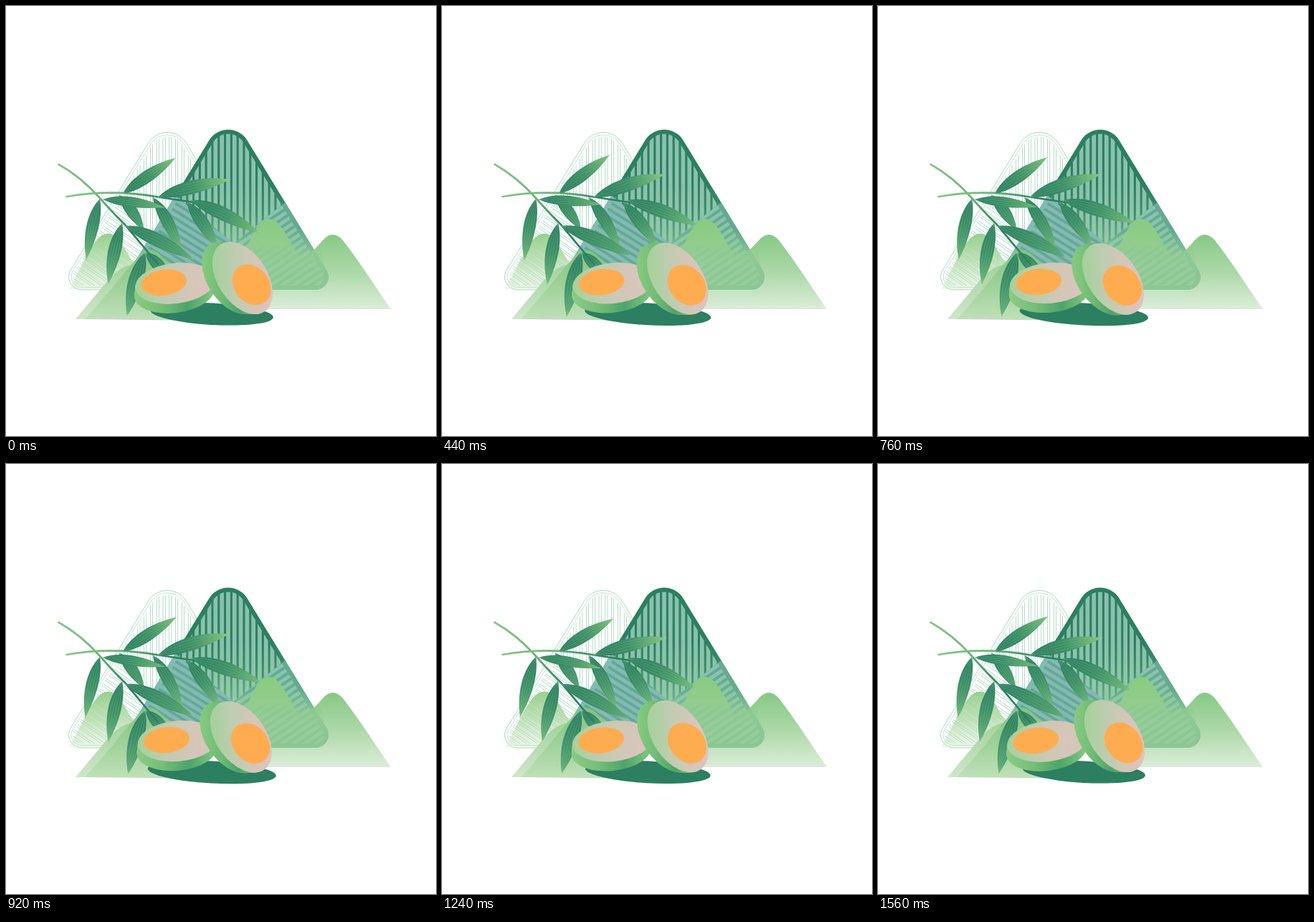
Write an HTML page with a canvas that moves like this. It is 600 by 600 pixels and loops after 1.6 s.

```html
<!DOCTYPE html>
<html lang="en">
<head>
<meta charset="utf-8">
<title>Rice dumpling hills</title>
<style>
  html, body { margin: 0; width: 100%; height: 100%; overflow: hidden; background: #fff; }
  canvas { display: block; }
</style>
</head>
<body>
<canvas id="stage" width="600" height="600"></canvas>
<script>
const ctx = document.getElementById('stage').getContext('2d');
const LOOP = 1600, STEP = 40, TAU = Math.PI * 2, DEG = Math.PI / 180;
const DARK = '#2c7f61', LIGHT = '#86c784';

function gradient(x0, y0, x1, y1, ...colors) {
  const g = ctx.createLinearGradient(x0, y0, x1, y1);
  colors.forEach((c, i) => g.addColorStop(i / (colors.length - 1), c));
  return g;
}

function fillPath(d, paint) {
  ctx.fillStyle = paint;
  ctx.fill(new Path2D(d));
}

function strokePath(path, paint, width) {
  ctx.strokeStyle = paint;
  ctx.lineWidth = width;
  ctx.stroke(path);
}

// Rounded triangle shared by both dumplings, apex above (cx, top).
function dumpling(cx, top, inset) {
  const slope = 1.636, apex = top - 29 + inset * 1.92, base = 396 - inset;
  const half = (base - apex) / slope, p = new Path2D();
  const left = [cx - half, base], right = [cx + half, base];
  p.moveTo(cx, base);
  p.arcTo(...right, cx, apex, 18 - inset);
  p.arcTo(cx, apex, ...left, 31 - inset);
  p.arcTo(...left, cx, base, 18 - inset);
  p.closePath();
  return p;
}

// Parallel slats: upright, or slanted when an angle is given.
function slats(cx, cy, angle, pitch, width, paint, outline) {
  ctx.save();
  ctx.translate(cx, cy);
  ctx.rotate(angle);
  ctx.fillStyle = ctx.strokeStyle = paint;
  ctx.lineWidth = 0.6;
  for (let i = -18; i <= 18; i++) {
    const x = i * pitch - width / 2;
    if (outline) ctx.strokeRect(x, -260, width, 520);
    else ctx.fillRect(x, -260, width, 520);
  }
  ctx.restore();
}

function clipped(paths, draw) {
  ctx.save();
  paths.forEach(p => ctx.clip(p));
  draw();
  ctx.restore();
}

function paleDumpling() {
  const line = '#83c6a6';
  const inner = dumpling(225, 177, 6);
  strokePath(dumpling(225, 177, 0), line, 0.7);
  strokePath(dumpling(225, 177, 3.5), line, 0.5);
  const fold = new Path2D('M60 150H320V400L146 272L60 272Z');
  const flap = new Path2D('M60 272H146L320 400H60Z');
  clipped([inner, fold], () => slats(225, 290, 0, 8.8, 5.6, line, true));
  clipped([inner, flap], () => slats(130, 340, -55 * DEG, 8.4, 5, line, true));
}

function greenDumpling() {
  const shell = dumpling(310, 173, 0), inner = dumpling(310, 173, 6);
  fillShape(shell, gradient(0, 173, 0, 396,
    DARK, DARK, DARK, '#3b8c6e', '#61a98c', '#84c391', '#8dc99a'));

  const front = new Path2D('M150 150H480V210L388 275L318 332L236 264L150 190Z');
  clipped([inner, front], () =>
    slats(310, 290, 0, 8.8, 5.7, gradient(0, -110, 0, 45, '#89c0b0', '#8ac2ac', '#95cba4')));

  const leftFlap = new Path2D('M130 200L236 264L318 332V400H130Z');
  const rightFlap = new Path2D('M480 215L388 275L318 332V400H480Z');
  clipped([shell, leftFlap], () => {
    ctx.fillStyle = '#82bbaf';
    ctx.fillRect(130, 180, 200, 220);
  });
  clipped([shell, rightFlap], () => {
    ctx.fillStyle = gradient(0, 275, 0, 352, '#65aa91', '#63ab8d', '#8bc795');
    ctx.fillRect(310, 180, 170, 220);
  });
  clipped([inner, leftFlap], () => slats(240, 320, -58 * DEG, 9, 3.8, '#66a69b'));
  clipped([inner, rightFlap], () => {
    ctx.fillStyle = gradient(0, 280, 0, 352, '#8ac2b3', '#8ac5a8', '#97cd9b');
    ctx.fillRect(310, 200, 170, 200);
    slats(400, 320, 56 * DEG, 9, 4, gradient(-33, -22, 27, 18, '#62a794', '#69ae92', '#8bc795'));
  });
}

function fillShape(path, paint) {
  ctx.fillStyle = paint;
  ctx.fill(path);
}

function farHills() {
  fillPath('M340 423V380L400 370Q420 352 442 327Q456 311 470 327C492 355 515 391 537 423Z',
    gradient(0, 319, 0, 423, '#87c985', '#acd8a8', '#dcedd9'));
}

function nearHills() {
  fillPath('M88 395C104 368 112 345 127 326Q142 309 158 326L200 395Z',
    gradient(0, 317, 0, 396, '#97cf8d', 'rgba(175,217,166,.75)', 'rgba(205,230,198,.35)'));
  fillPath('M97 437L142 383Q160 362 180 360L230 400V437Z',
    gradient(0, 365, 0, 437, '#a5d49f', '#cfe6ca'));
  fillPath('M110 437C140 405 165 371 188 346Q202 333 217 349L275 400V439Z',
    gradient(0, 340, 0, 438, '#80c380', '#9ed198', '#c0e0ba'));
  // Soft hill lapping over the lower right corner of the dumpling.
  fillPath('M320 350C337 345 341 321 352 306Q367 288 382 306C393 319 400 340 411 350' +
    'Q425 346 437 333L446 362L436 368H320Z',
    gradient(0, 297, 0, 368, '#88cb80', '#92cd8d', 'rgba(145,203,152,0)'));
}

function branches() {
  ctx.lineCap = 'round';
  strokePath(new Path2D('M73.5 221Q104 238 130 267T165 304L212 360'),
    gradient(73, 220, 175, 310, LIGHT, '#6eb678', DARK), 2.7);
  strokePath(new Path2D('M84.5 266Q148 255 212 266.5L262 274'),
    gradient(84, 0, 230, 0, LIGHT, '#6eb678', DARK), 2.7);
}

// Base, resting tip, width, swing in radians, phase in degrees, bend, tip colour.
const LEAVES = [
  [158, 264, 193, 313, 17, 0.02, -20, -2, '#4c9b6c'],
  [205, 267, 246, 341, 18, 0.04, -30, -3, '#6bb476'],
  [253, 274, 297, 336, 19, 0.045, -30, -2, '#6bb476'],
  [195, 344, 232, 385, 18, 0.03, -25, -2, '#4c9b6c'],
  [131, 269, 112, 354, 18, 0.036, 0, 2, '#68b278'],
  [135, 270, 221, 281, 15, 0.046, 0, -2, '#68b273'],
  [162, 303, 143.5, 388, 19, 0.042, -15, 2, '#68b278'],
  [166, 307, 262, 352, 20, 0.04, -20, -3, '#56a470'],
  [194, 344, 170.5, 432.5, 22, 0.04, -25, 2, '#62ad76'],
  [163, 262, 236.5, 212, 18, 0.055, 0, -1, '#7abf79'],
  [212, 267, 312, 238.7, 20, 0.047, -45, -3, '#86c67e'],
  [258, 271, 355.7, 310, 20, 0.072, -68, -3, '#72b978']
];

function leaf([x, y, tipX, tipY, width, swing, phase, bend, tipColor], angle) {
  const len = Math.hypot(tipX - x, tipY - y);
  const rib = w => `C${len * 0.26} ${w * 0.66 + bend} ${len * 0.64} ${w * 0.6 + bend} ${len} 0`;
  ctx.save();
  ctx.translate(x, y);
  ctx.rotate(Math.atan2(tipY - y, tipX - x) - swing * Math.sin(angle + phase * DEG));
  const body = new Path2D(`M0 0${rib(-width)}L0 0${rib(width)}L0 0Z`);
  fillShape(body, gradient(0, 0, len, 0, '#287b60', '#3f9169', tipColor));
  ctx.globalAlpha = 0.35;
  for (const k of [-0.6, -0.2, 0.2, 0.6])
    strokePath(new Path2D('M0 0' + rib(width * k)), '#9bd09a', 0.6);
  ctx.restore();
}

function ellipse(x, y, rx, ry, tilt, paint) {
  ctx.fillStyle = paint;
  ctx.beginPath();
  ctx.ellipse(x, y, rx, ry, tilt * DEG, 0, TAU);
  ctx.fill();
}

// A half egg: the cut face swept along (dx, dy) gives the shell.
function egg(x, y, rx, ry, tilt, dx, dy, shell, face) {
  for (let i = 12; i > 0; i--)
    ellipse(x + dx * i / 12, y + dy * i / 12, rx, ry, tilt, shell);
  ellipse(x, y, rx, ry, tilt, face);
}

function turnAbout(x, y, angle) {
  ctx.translate(x, y);
  ctx.rotate(angle);
  ctx.translate(-x, -y);
}

function eggs(lean) {
  ellipse(287.3, 429.7 + lean * 0.4, 85.7 + lean * 4.2, 15.2 + lean * 0.3, 3.2, DARK);

  ctx.save();
  ctx.translate(lean * 2.5, 0);
  turnAbout(250, 430, lean * 0.035);
  egg(236, 387, 56, 28.3, -7, -1, 13,
    gradient(180, 0, 290, 0, '#8acb83', '#76bd78', '#4da468', '#86c784'),
    gradient(181, 0, 291, 0, '#a6d19a', '#bdcdb0', '#d3c7b8', '#dcc4bd'));
  ellipse(220.3, 386, 32, 18, -8, '#ffac50');
  ctx.restore();

  ctx.save();
  turnAbout(360, 428, lean * -0.045);
  egg(330, 379.5, 56, 34.6, 57, -14.5, 0,
    gradient(273, 0, 352, 0, '#86cb80', '#72bb76', '#4da468', '#83c581'),
    gradient(288, 0, 372, 0, '#a4d199', '#bccdaf', '#d2c7b8', '#dfc2be'));
  ellipse(342.7, 389, 30.7, 24.3, 52, '#ffac50');
  ctx.restore();
}

function draw(now) {
  const time = Math.floor((now % LOOP) / STEP) * STEP;
  const angle = time / LOOP * TAU;
  ctx.fillStyle = '#fff';
  ctx.fillRect(0, 0, 600, 600);
  paleDumpling();
  farHills();
  greenDumpling();
  nearHills();
  LEAVES.slice(0, 4).forEach(l => leaf(l, angle));
  branches();
  LEAVES.slice(4).forEach(l => leaf(l, angle));
  eggs((1 - Math.cos(angle)) / 2);
}

const start = performance.now();
function tick() {
  draw(performance.now() - start);
  requestAnimationFrame(tick);
}
tick();
</script>
</body>
</html>
```
